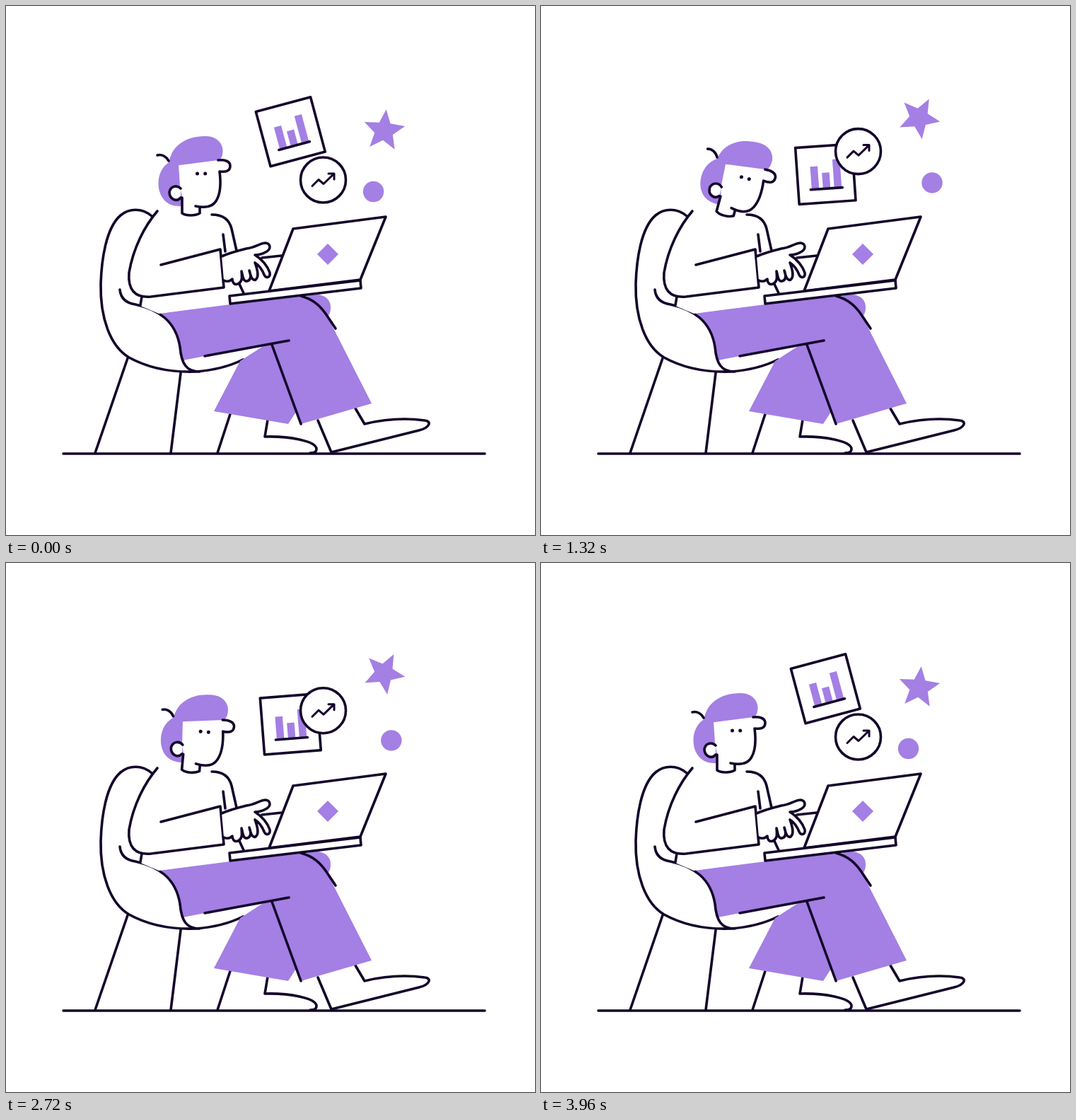
Write an HTML page with a canvas that moves like this. It is 748 px wide and 748 px high and loops after 4 s.

```html
<!DOCTYPE html>
<html lang="en">
<head>
<meta charset="utf-8">
<title>Working on a laptop</title>
<style>
html, body { margin: 0; width: 100%; height: 100%; overflow: hidden; background: #fff; }
canvas { display: block; width: 748px; height: 748px; }
</style>
</head>
<body>
<canvas id="stage"></canvas>
<script>
const SIZE = 748, LOOP = 4000, END = 3960;
const INK = '#130329', PURPLE = '#a47fe4', WHITE = '#fff';
const canvas = document.getElementById('stage');
const ctx = canvas.getContext('2d');
const dpr = window.devicePixelRatio || 1;
canvas.width = canvas.height = SIZE * dpr;

const clamp = v => Math.min(1, Math.max(0, v));
const smooth = v => v * v * (3 - 2 * v);
const smoother = v => v * v * v * (v * (6 * v - 15) + 10);
const span = (t, a, b) => clamp((t - a) / (b - a));

// 0 to 1 at the peak, then back to 0 at the end of the loop
const swing = (t, peak, out = smooth) =>
  t < peak ? out(t / peak) : smooth(1 - span(t, peak, END));

function fill(d, color = WHITE) {
  ctx.fillStyle = color;
  ctx.fill(new Path2D(d));
}

function line(d, width = 3.6) {
  ctx.strokeStyle = INK;
  ctx.lineWidth = width;
  ctx.stroke(new Path2D(d));
}

function shape(d, color) {
  fill(d, color);
  line(d);
}

function disc(x, y, rx, ry, color) {
  ctx.fillStyle = color;
  ctx.beginPath();
  ctx.ellipse(x, y, rx, ry, 0, 0, Math.PI * 2);
  ctx.fill();
}

function placed(x, y, degrees, draw) {
  ctx.save();
  ctx.translate(x, y);
  ctx.rotate(degrees * Math.PI / 180);
  draw();
  ctx.restore();
}

function drawChair() {
  line('M206 297 C192 285 174 286 162 296 C141 314 135 360 134 393 C133 440 147 481 174 497 C205 514 240 518 268 517 C295 515 315 510 335 500');
  line('M172 498 L126 632 M247 519 L233 632');
}

function drawLegs() {
  line('M317 577 L299 632 M370 585 L366 609 C400 608 438 615 439 626 C439 631 436 632 430 632');
  fill('M377 478 L362 482 L331 502 L294 573 L399 591 L412 571 Z', PURPLE);
  shape('M441 586 L460 631 L584 600 C600 596 602 587 592 586 C570 583 540 583 507 591 L494 569');
  fill('M424 411 C444 403 460 412 459 427 C459 434 456 438 453 441 Z', PURPLE);
  fill('M216 435 L418 409 C438 415 447 428 455 440 L517 562 L417 591 L376 478 L281 495 L250 501 C246 470 240 447 216 435 Z', PURPLE);
  line('M417 410 C436 415 446 426 454 438 L466 456');
  line('M281 495 L400 473 M376 479 L417 591');
  line('M161 401 C162 412 169 420 183 422 C215 429 240 445 246 482 C248 506 255 517 274 517');
  line('M81 633 L677 633');
}

function drawBody() {
  fill('M190 411 L308 398 L336 406 L318 420 L216 435 L190 424 Z');
  line('M192 411 L190 423');
  line('M214 290 C196 311 180 342 174 377 C172 401 182 413 205 411 L308 398 L303 344 L219 366');
  line('M291 295 C308 295 316 303 319 315 L326 346 M307 323 L310 347');
  line('M329 391 L336 406 M362 356 L390 353');
}

function drawLaptop() {
  shape('M406 315 L537 298 L501 387 L372 403 Z');
  shape('M316 410 L501 388 L502 399 L317 421 Z');
  fill('M455 336 L470 351 L455 366 L440 351 Z', PURPLE);
}

function drawHand() {
  shape('M305 354 C316 349 328 346 340 343 C351 342 360 335 367 335 C374 336 375 343 369 347 C364 350 358 352 352 352 C362 358 370 368 373 377 C374 384 368 386 365 380 C362 372 358 367 352 363 C356 374 358 383 353 387 C348 389 346 382 344 374 C347 382 346 388 341 389 C335 390 335 382 333 375 C334 385 334 390 328 393 C323 395 320 391 320 386 C316 390 312 390 308 388');
}

function drawHead(t) {
  const tilt = 15 * (smooth(span(t, 330, 820)) - smooth(span(t, 2420, 2920)));
  const blink = 1 - 0.85 * clamp(1 - (Math.abs(t - 2200) - 20) / 110);
  placed(258.7, 288.6, tilt, () => {
    ctx.translate(-258.7, -288.6);
    fill('M245 220 L232 220 C217 229 213 246 217 262 C221 276 232 284 248 283 L249 270 L246 255 L244 224 Z', PURPLE);
    fill('M230 227 C231 199 253 184 282 184 C300 184 309 197 306 210 C305 215 303 217 300 218 Z', PURPLE);
    line('M214 211 C220 209 227 213 230 219');
    shape('M247 258 C242 253 233 254 231 263 C231 273 241 278 247 271');
    line('M249 271 L249 293 C255 297 267 297 274 293 L274 285');
    line('M300 218 C308 217 317 219 317 226 C317 234 310 235 302 234 C304 250 303 265 298 274 C293 284 282 286 268 283');
    disc(270.5, 237, 2.5, 2.5 * blink, INK);
    disc(281.7, 237, 2.5, 2.5 * blink, INK);
  });
}

function drawChart(t, turn) {
  placed(402.3, 177.8 + 77 * swing(t, 1900), -15 * turn, () => {
    shape('M-40 -40 H40 V40 H-40 Z');
    [[-21, -12], [-5, -2], [11, -20]].forEach(([x, y]) =>
      fill(`M${x} ${y} h10.5 V20 h-10.5 Z`, PURPLE));
    line('M-22.5 20.5 H22.5');
  });
}

function drawBadge(t) {
  placed(448.5, 246 - 54.5 * swing(t, 1980), 0, () => {
    shape('M32 0 A32 32 0 1 1 -32 0 A32 32 0 1 1 32 0 Z');
    line('M-15.5 8.5 L-6.5 -0.5 L0.5 5.5 L15 -8.5 M7.5 -9 H15.5 V-1', 3);
  });
}

function drawStar(t, turn) {
  placed(534.5, 176.4 - 27 * swing(t, 2140), -30 * turn, () => {
    ctx.fillStyle = PURPLE;
    ctx.beginPath();
    for (let i = 0; i < 10; i++) {
      const r = i % 2 ? 13.5 : 30.3, a = Math.PI / 2 + i * Math.PI / 5;
      ctx.lineTo(r * Math.cos(a), r * Math.sin(a));
    }
    ctx.fill();
  });
}

function drawBall(t) {
  const x = swing(t, 1980, s => 1 - (1 - s) ** 2.15);
  const y = swing(t, 1980, s => smoother(s) ** 1.3);
  disc(519.5 + 37 * x, 262.5 - 17 * y, 14.7, 14.7, PURPLE);
}

function render(now) {
  const t = now % LOOP;
  const turn = 1 - span(t, 0, 1800) + span(t, 2200, END);
  ctx.setTransform(dpr, 0, 0, dpr, 0, 0);
  ctx.fillStyle = WHITE;
  ctx.fillRect(0, 0, SIZE, SIZE);
  ctx.lineCap = ctx.lineJoin = 'round';
  drawChair();
  drawLegs();
  drawBody();
  drawHead(t);
  drawChart(t, turn);
  drawBadge(t);
  drawStar(t, turn);
  drawBall(t);
  drawLaptop();
  drawHand();
}

const start = performance.now();
function tick() {
  render(performance.now() - start);
  requestAnimationFrame(tick);
}
tick();
</script>
</body>
</html>
```
